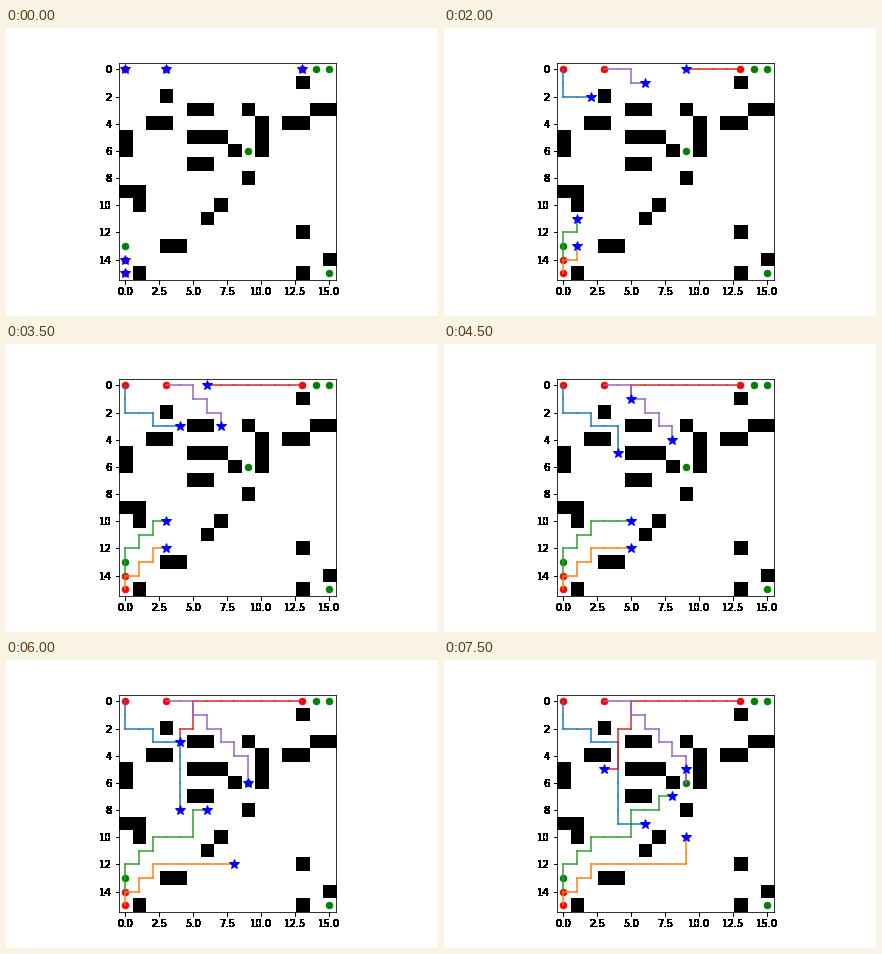
A matplotlib script for the animation above (8 s loop, 432x288 px).

```python
import numpy as np
import matplotlib.pyplot as plt
from matplotlib.animation import FuncAnimation

N = 16
STEPS = 16
INTERVAL = 500

# Wall bars: (width, height) -> top-left cells
BARS = {
    (1, 1): [(13, 1), (3, 2), (9, 3), (8, 6), (9, 8), (1, 10), (7, 10),
             (6, 11), (13, 12), (15, 14), (1, 15), (13, 15)],
    (2, 1): [(5, 3), (14, 3), (2, 4), (12, 4), (5, 7), (0, 9), (3, 13)],
    (3, 1): [(5, 5)],
    (1, 2): [(0, 5)],
    (1, 3): [(10, 4)],
}
GOALS = [(14, 0), (15, 0), (9, 6), (0, 13), (15, 15)]

# Start cell and moves: up, down, left, right, wait
AGENTS = [
    ((0, 0), "DDRRDRR" + "D" * 6 + "RR"),
    ((0, 15), "W" + "UR" * 2 + "U" + "R" * 7 + "UU"),
    ((0, 14), "U" + "UR" * 3 + "RRUURRUR"),
    ((13, 0), "L" * 8 + "DDL" + "DDDL"),
    ((3, 0), "R" + "RD" * 5 + "DWWU"),
]
MOVES = {"U": (0, -1), "D": (0, 1), "L": (-1, 0), "R": (1, 0), "W": (0, 0)}


def walk(start, moves):
    return np.cumsum([start] + [MOVES[m] for m in moves], axis=0)


def harden(img, dpi):
    """Turn every touched pixel opaque, for hard-edged ticks and labels."""
    img = img.copy()
    img[..., 3] = img[..., 3] > 0
    return img, 0, 0


fig = plt.figure(figsize=(6, 4), dpi=72, facecolor="white")
ax = fig.add_axes([0.125, 0.125, 0.775, 0.755])

grid = np.zeros((N, N))
for (w, h), cells in BARS.items():
    for x, y in cells:
        grid[y:y + h, x:x + w] = 1
ax.imshow(grid, cmap="binary", interpolation="nearest")
ax.set_xticks(np.arange(0, N, 2.5))
ax.set_yticks(range(0, N, 2))
ax.xaxis.set_major_formatter("{x:.1f}")
for axis in (ax.xaxis, ax.yaxis):
    axis.set_agg_filter(harden)

paths = [walk(*agent) for agent in AGENTS]
for cells, style in (([p[0] for p in paths], "ro"), (GOALS, "go")):
    ax.plot(*zip(*cells), style, ms=6.5)

trails = []
for i, path in enumerate(paths):
    for k in range(1, STEPS):
        if (path[k] != path[k - 1]).any():
            line, = ax.plot(*path[k - 1:k + 1].T, color=f"C{i}", lw=1.5)
            trails.append((k, line))
stars, = ax.plot([], [], "b*", ms=10, zorder=3)
ax.set(xlim=(-0.5, N - 0.5), ylim=(N - 0.5, -0.5))


def update(step):
    for k, line in trails:
        line.set_visible(k <= step)
    stars.set_data(*np.array([p[step] for p in paths]).T)
    return [stars] + [line for _, line in trails]


anim = FuncAnimation(fig, update, frames=STEPS, interval=INTERVAL,
                     init_func=lambda: update(0), repeat=True, repeat_delay=0)
plt.show()
```
